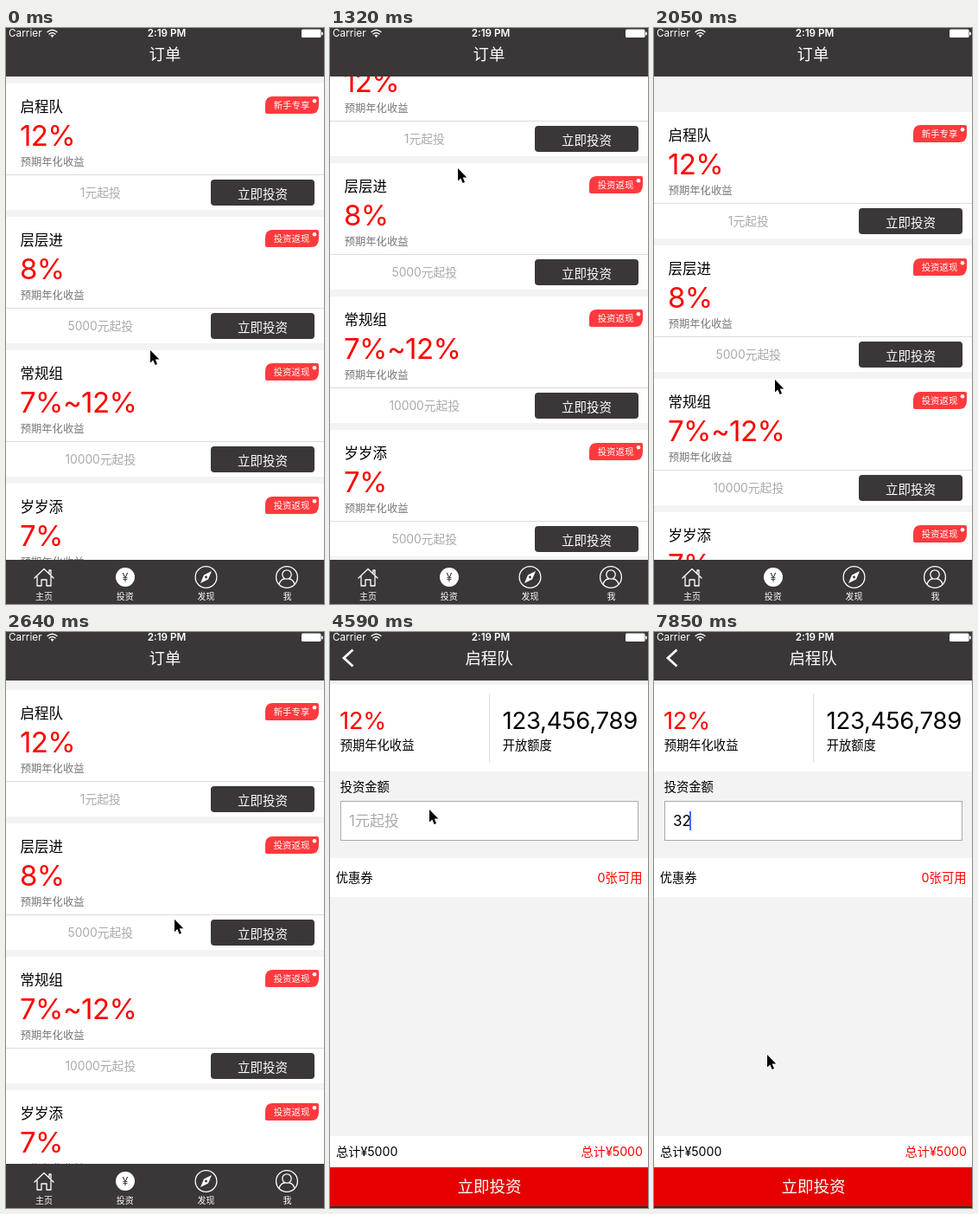
An HTML page for the animation above (8000 ms loop, 368 by 665 pixels).

```html
<!DOCTYPE html>
<html lang="zh-CN">
<head>
<meta charset="utf-8">
<title>订单</title>
<style>
html, body { margin: 0; width: 100%; height: 100%; overflow: hidden; background: #f3f3f3; }
svg { display: block; width: 368px; height: 665px; }
text { font-family: Inter, "Noto Sans CJK SC", "Noto Sans CJK", sans-serif; white-space: pre; }
.line { fill: none; stroke: #fff; stroke-width: 1.3; stroke-linejoin: round; stroke-linecap: round; }
</style>
</head>
<body>
<svg id="stage" viewBox="0 0 368 665"></svg>
<script>
const DARK = '#3b3637', GRAY = '#f3f3f3', RED = '#ff0000', BUTTON = '#e60000';
const LOOP = 8000, STEP = 148.1, LEAD = 23, LAST_STEP = 53;

const rect = (x, y, w, h, fill, extra = '') =>
  `<rect x="${x}" y="${y}" width="${w}" height="${h}" fill="${fill}" ${extra}/>`;
const text = (x, y, size, fill, str, anchor = 'start', extra = '') =>
  `<text x="${x}" y="${y}" font-size="${size}" fill="${fill}" text-anchor="${anchor}" ${extra}>${str}</text>`;
const line = d => `<path class="line" d="${d}"/>`;
const circle = (x, y, r) => `<circle class="line" cx="${x}" cy="${y}" r="${r}"/>`;

const plans = [
  ['启程队', '12%', '1元起投', '新手专享'],
  ['层层进', '8%', '5000元起投', '投资返现'],
  ['常规组', '7%~12%', '10000元起投', '投资返现'],
  ['岁岁添', '7%', '5000元起投', '投资返现']
];

function card([name, rate, minimum, badge], i) {
  return `<g transform="translate(0 ${64 + i * 154})">
    ${rect(0, 0, 368, 146, '#fff')}
    ${text(16.5, 33, 16.5, '#000', name)}
    ${text(16, 72, 33, RED, rate, 'start', 'letter-spacing="-.6"')}
    ${text(16.7, 95.3, 12.3, '#777', '预期年化收益')}
    ${rect(0, 105, 368, 1, '#dcdcdc')}
    ${text(109.3, 131, 13.8, '#aaa', minimum, 'middle')}
    ${rect(237, 111, 120, 30, DARK, 'rx="4"')}
    ${text(297, 132.5, 14.5, '#fff', '立即投资', 'middle')}
    <path d="M309 15H360Q362 15 362 17V25Q362 35 353 35H302Q300 35 300 33V24Q300 15 309 15Z" fill="#ff3a3e"/>
    <circle cx="357" cy="20.3" r="2.3" fill="#fff"/>
    ${text(330.5, 29.3, 10.4, '#fff', badge, 'middle')}
  </g>`;
}

function tabBar() {
  const labels = ['主页', '投资', '发现', '我'];
  return rect(0, 614, 368, 51, DARK) +
    labels.map((s, i) => text(44 + i * 93.8, 660, 10, '#fff', s, 'middle')).join('') +
    line('M33 635L44 624.5 55 635M36 633V644H41V637H47V644H52V633M50 629V626H52V631') +
    '<circle cx="138" cy="634" r="11" fill="#fff"/>' +
    text(138, 638.5, 12.5, DARK, '¥', 'middle') +
    circle(231.5, 634, 12.4) +
    '<path d="M238 627L234 636.5 225 641 229 631.5Z" fill="#fff"/>' +
    `<circle cx="231.5" cy="634" r="1.4" fill="${DARK}"/>` +
    circle(325, 634, 12.4) + circle(325, 631, 5.2) +
    line('M316 642Q318 636.5 322.2 636M327.8 636Q332 636.5 334 642');
}

function listPage() {
  return rect(0, 0, 368, 665, GRAY) +
    `<g id="cards">${plans.map(card).join('')}</g>` +
    rect(0, 0, 368, 56, DARK) +
    text(184, 37, 18.4, '#fff', '订单', 'middle') +
    tabBar();
}

// Backgrounds bleed slightly past the left edge, visible while the page slides in.
function detailPage() {
  const band = (y, h, fill, extra) => rect(-3, y, 371, h, fill, extra);
  return band(0, 665, GRAY) + band(0, 56, DARK) +
    '<path d="M26.5 20.5L16 30 26.5 39.5" fill="none" stroke="#fff" stroke-width="2.8"/>' +
    text(184, 37, 18.4, '#fff', plans[0][0], 'middle') +
    band(61, 100, '#fff') + rect(184, 71, 1, 80, '#ddd') +
    text(11, 111.5, 27.5, RED, '12%', 'start', 'letter-spacing="-.4"') +
    text(199.5, 111.5, 27.5, '#000', '123,456,789', 'start', 'letter-spacing="-.25"') +
    text(11.7, 136, 14.3, '#000', '预期年化收益') +
    text(199.7, 136, 14.3, '#000', '开放额度') +
    text(11.7, 184, 14.3, '#000', '投资金额') +
    rect(12.5, 195.5, 344, 45, '#fff', 'stroke="#aaa"') +
    text(22, 224, 17, '#aaa', '1元起投', 'start', 'id="field"') +
    rect(23, 207, 2, 22, '#426bf2', 'id="caret"') +
    band(261, 45, '#fff') +
    text(6.7, 289.3, 14.3, '#000', '优惠券') +
    text(361.5, 289.3, 14.3, RED, '0张可用', 'end') +
    band(582, 36, '#fff') +
    text(7, 605, 14.2, '#000', '总计¥5000') +
    text(362, 605, 14.2, RED, '总计¥5000', 'end') +
    band(618, 45, BUTTON, 'id="submit"') +
    text(184.5, 647, 18.5, '#fff', '立即投资', 'middle') +
    band(663, 2, '#2e2a2b');
}

function statusBar() {
  return text(3, 10.3, 11.8, '#fff', 'Carrier') +
    line('M48 4.6Q53.5-.2 59 4.6M50 7Q53.5 4 57 7') +
    '<path d="M51.5 8.6Q53.5 7 55.5 8.6L53.5 11Z" fill="#fff"/>' +
    text(186, 10.3, 11.7, '#fff', '2:19 PM', 'middle', 'font-weight="600"') +
    rect(342, 1.5, 22.5, 9.5, '#fff', 'rx="1.5"') + rect(365, 4.5, 1.7, 4, '#fff', 'rx=".8"');
}

const stage = document.getElementById('stage');
stage.innerHTML =
  `<g id="list">${listPage()}</g><g id="detail">${detailPage()}</g>${statusBar()}` +
  `<path id="pointer" d="M0 0V14.5L3.3 11.4 5.6 17 8 16 5.7 10.5H10.3Z"
    stroke="#fff" paint-order="stroke" stroke-width="2"/>`;
const $ = id => document.getElementById(id);

// Keys are [step, value, ...].
const scrollKeys = [[0, 0], [1, -10], [2, -36], [3, -65], [4, -83], [5, -90], [6, -85], [7, -72],
  [8, -66], [9, -62], [10, -32], [11, 10], [12, 48], [13, 58], [14, 33], [15, 14], [16, 6], [17, 3], [20, 0]];
const pushKeys = [[25, 0], [26, .38], [27, .86], [28, .98], [29, 1]];
const pointerKeys = [[0, 167, 372], [1, 166, 350], [4, 153, 195], [6, 149, 164], [8, 148, 158], [9, 148, 162],
  [10, 147, 205], [13, 141, 396], [14, 140, 406], [16, 150, 390], [19, 285, 215], [20, 297, 194],
  [26, 297, 194], [28, 225, 198], [31, 115, 205], [33, 88, 135], [34, 84, 116], [37, 89, 200], [38, 90, 213],
  [44, 90, 213], [45, 100, 250], [49, 154, 644], [52, 154, 644], [53, 131, 488]];

function sample(keys, step) {
  const next = keys.findIndex(k => k[0] > step);
  if (next === 0) return keys[0].slice(1);
  if (next < 0) return keys[keys.length - 1].slice(1);
  const a = keys[next - 1], b = keys[next];
  const k = (step - a[0]) / (b[0] - a[0]);
  return a.slice(1).map((v, i) => v + (b[i + 1] - v) * k);
}

const move = (id, x, y) => $(id).setAttribute('transform', `translate(${x} ${y})`);
const within = (step, from, to) => step >= from && step < to;

function render(time) {
  const step = Math.min(LAST_STEP, Math.floor((time % LOOP + LEAD) / STEP));
  const [push] = sample(pushKeys, step);
  move('cards', 0, sample(scrollKeys, step)[0]);
  move('list', -118 * push, 0);
  move('detail', push ? 368 * (1 - push) : 372, 0);
  move('pointer', ...sample(pointerKeys, step));

  const typed = '32'.slice(0, Math.max(0, step - 41));
  $('field').textContent = typed || '1元起投';
  $('field').setAttribute('fill', typed ? '#000' : '#aaa');
  $('caret').setAttribute('x', [23, 32, 41][typed.length]);
  const blinkOff = within(step, 47, 49) || within(step, 51, 53);
  $('caret').setAttribute('opacity', step >= 38 && !blinkOff ? 1 : 0);
  $('submit').setAttribute('fill', step === 50 ? '#b80000' : BUTTON);
}

const start = performance.now();
function tick(now) {
  render(Math.max(0, now - start));
  requestAnimationFrame(tick);
}
render(0);
requestAnimationFrame(tick);
</script>
</body>
</html>
```
